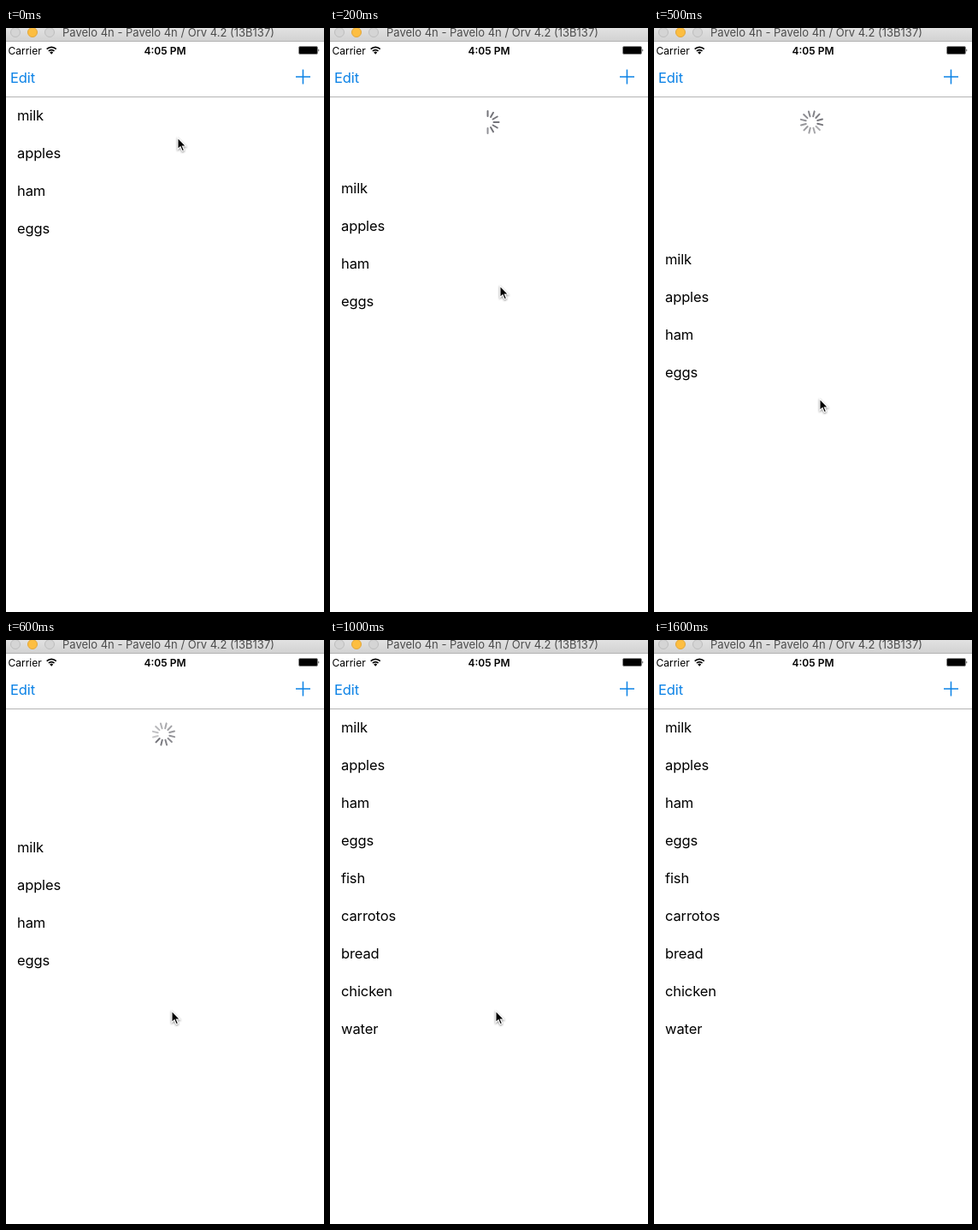
Write an HTML page that moves like this. It is 372 px wide and 682 px high and loops after 2400 ms.

```html
<!DOCTYPE html>
<html lang="en">
<head>
<meta charset="utf-8">
<title>Pull to refresh</title>
<style>
  html, body { margin: 0; height: 100%; overflow: hidden; background: #fff; }
  svg { display: block; width: 372px; height: 682px; font-family: Inter, Roboto, sans-serif; }
  .body { font-size: 16.5px; letter-spacing: -.12px; }
  .status { font-size: 12px; }
  #cursor { filter: drop-shadow(0 1px 1px rgba(0, 0, 0, .45)); }
</style>
</head>
<body>
<svg viewBox="0 0 372 682">
  <defs>
    <linearGradient id="chrome" x2="0" y2="1">
      <stop stop-color="#e2e2e2"/>
      <stop offset="1" stop-color="#d2d2d2"/>
    </linearGradient>
  </defs>

  <g id="spinner" stroke="#74747a" stroke-width="2" stroke-linecap="round"></g>
  <g id="list">
    <rect y="81" width="372" height="700" fill="#fff"/>
    <g id="rows" class="body"></g>
    <g id="lines" fill="#c8c8cb"></g>
  </g>

  <rect width="372" height="80" fill="#fff"/>
  <rect y="80" width="372" height="1" fill="#b4b4b4"/>
  <rect width="372" height="15" fill="url(#chrome)"/>
  <rect y="15" width="372" height="1" fill="#b3b3b3"/>
  <g stroke-width="1">
    <circle cx="11" cy="5" r="5.5" fill="#d5d5d5" stroke="#bebebe"/>
    <circle cx="31" cy="5" r="5.5" fill="#fdbe41" stroke="#e2a73c"/>
    <circle cx="51" cy="5" r="5.5" fill="#d5d5d5" stroke="#bebebe"/>
  </g>
  <text x="66" y="10" font-size="13" fill="#4c4c4c">Pavelo 4n - Pavelo 4n / Orv 4.2 (13B137)</text>

  <text class="status" x="2.5" y="30.5">Carrier</text>
  <g fill="none" stroke="#000" stroke-width="1.7">
    <path d="M47.7 24.7a7.6 7.6 0 0 1 11 0M49.9 27a4.6 4.6 0 0 1 6.6 0"/>
    <path d="M51.2 28.6a2.8 2.8 0 0 1 4 0L53.2 30.8Z" fill="#000" stroke="none"/>
  </g>
  <text class="status" x="186" y="30.5" font-weight="600" text-anchor="middle">4:05 PM</text>
  <rect x="342.5" y="21.5" width="22" height="9" rx="1.5" stroke="#888"/>
  <path d="M365.5 24.2q1.8 1.8 0 3.6Z"/>

  <g fill="#0b82e6">
    <text class="body" x="5" y="64">Edit</text>
    <path d="M339 56.3h17v1.5h-17zM346.7 48.5h1.5v17h-1.5z"/>
  </g>

  <g id="cursor">
    <path d="M.9 1.2V14.7L4 11.8 6.1 16.8 8.5 15.8 6.4 11H10.6Z" stroke="#fff" stroke-width="1.2"/>
  </g>
</svg>

<script>
const STEP = 100, LOOP = 2400, ROW = 44, SPOKES = 12;
const items = ["milk", "apples", "ham", "eggs", "fish", "carrotos", "bread", "chicken", "water"];
const $ = id => document.getElementById(id);

// List offset per step: drag down, release, spring back
const offsets = [0, 25, 85, 139, 160, 168, 140, 75, 30, 9, 0];
const drag = [[200, 127], [200, 186], [198, 300], [195, 392], [193, 424], [193, 432]];
const leave = [[150, 340], [80, 170], [21, 25]];
const LEAVE_AT = 13, RELOAD_AT = 8, SPIN_AT = 5;
const lineSteps = [1, 7, 9];

function add(parent, tag, attrs, text = "") {
  const el = document.createElementNS("http://www.w3.org/2000/svg", tag);
  for (const key in attrs) el.setAttribute(key, attrs[key]);
  el.textContent = text;
  return parent.appendChild(el);
}

const rows = items.map((name, i) => add($("rows"), "text", { x: 13, y: 108 + ROW * i }, name));
for (let i = 0; i < 13; i++)
  add($("lines"), "rect", { x: 13, y: 123 + ROW * i, width: 359, height: 1 });
const spokes = Array.from({ length: SPOKES }, (_, i) =>
  add($("spinner"), "path", { d: "M0-13V-7", transform: `rotate(${i * 360 / SPOKES})` }));

function spokeOpacity(i, step, offset) {
  if (step < SPIN_AT) return Math.max(0, Math.min(1, (offset - 20) / 115 * SPOKES - i));
  const head = Math.floor((step - 4) * 3.5);
  const age = (head - i + 2 * SPOKES) % SPOKES;
  const depth = Math.min(.8, .4 + .2 * (step - SPIN_AT));
  return 1 - depth * age / (SPOKES - 1);
}

function render(step) {
  const offset = offsets[step] ?? 0;
  $("list").setAttribute("transform", `translate(0 ${offset})`);
  $("lines").style.display = lineSteps.includes(step) ? "" : "none";
  rows.forEach((row, i) => row.style.display = i < 4 || step >= RELOAD_AT ? "" : "none");

  const scale = step < RELOAD_AT ? 1 : .5;
  const angle = step < 3 ? 0 : step < SPIN_AT ? 2 : 14;
  $("spinner").style.display = step <= RELOAD_AT ? "" : "none";
  $("spinner").setAttribute("transform", `translate(184.5 110) rotate(${angle}) scale(${scale})`);
  spokes.forEach((spoke, i) => spoke.setAttribute("opacity", spokeOpacity(i, step, offset)));

  const place = step < LEAVE_AT ? drag[Math.min(step, drag.length - 1)] : leave[step - LEAVE_AT];
  $("cursor").style.display = place ? "" : "none";
  if (place) $("cursor").setAttribute("transform", `translate(${place})`);
}

const start = performance.now();
function tick() {
  render(Math.floor((performance.now() - start) % LOOP / STEP));
  requestAnimationFrame(tick);
}
tick();
</script>
</body>
</html>
```
